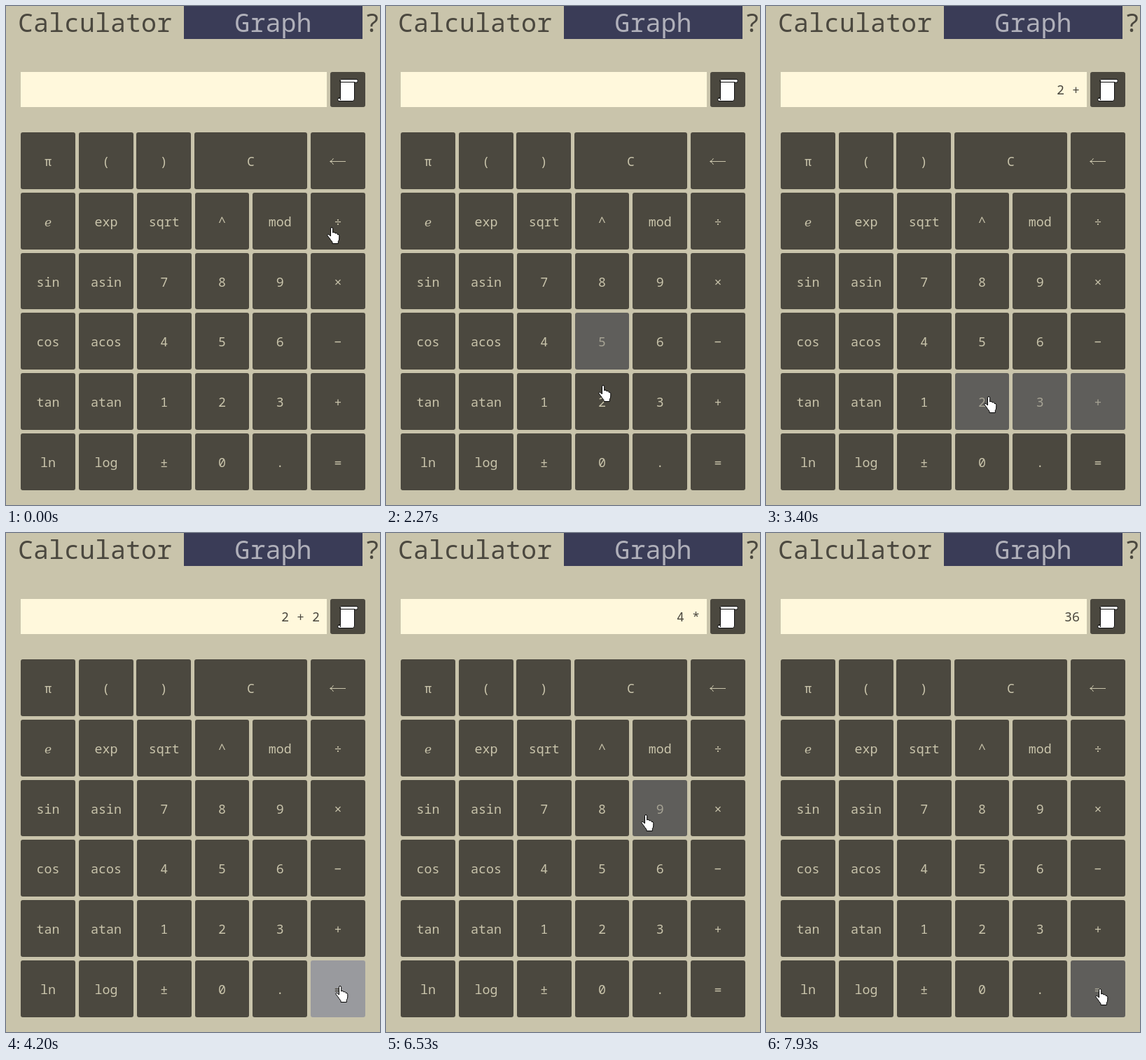
An HTML page for the animation above (8000 ms loop, 534 by 711 pixels).

```html
<!DOCTYPE html>
<html lang="en">
<head>
<meta charset="utf-8">
<title>Calculator</title>
<style>
  html, body { margin: 0; width: 100%; height: 100%; overflow: hidden; background: #c9c4ab; }
  svg { display: block; width: 534px; height: 711px; }
  text { font: 500 18.333px "Noto Sans Mono", monospace; fill: #4b483f; white-space: pre; }
  .title { font-size: 36.667px; font-weight: 400; }
  .key { fill: #4b483f; }
  .key text { fill: #c9c4ab; text-anchor: middle; }
  .key .script { font: italic 17px "DejaVu Sans", sans-serif; }
  .key path { fill: none; stroke: #c9c4ab; }
  .key.hover { fill: #5f5e5b; }
  .key.hover text { fill: #a6a394; }
  .key.press { fill: #999a9e; }
  .key.press text { fill: #4b483f; }
</style>
</head>
<body>
<svg viewBox="0 0 534 711">
  <rect width="534" height="711" fill="#c9c4ab"/>
  <text class="title" x="17" y="37">Calculator</text>
  <rect x="254" width="255" height="47" fill="#3a3c57"/>
  <text class="title" x="326.5" y="37" style="fill:#b0b0ba">Graph</text>
  <text class="title" x="512" y="37">?</text>
  <rect x="21" y="94" width="437" height="50" fill="#fff8dc"/>
  <text id="display" x="448" y="126" text-anchor="end"></text>
  <rect x="463" y="94" width="50" height="50" rx="3" fill="#4b483f"/>
  <g fill="#fff" stroke="#111">
    <path d="M477.5 106V131H474.5Q473 133 474.5 135.5H495Q497.5 135 497.5 132V109H501.5Q503 106.5 501.5 104.5H479Q476 104.5 477.5 109"/>
    <path d="M478 108.5H498M474.5 131.5H477.5V134" fill="none"/>
  </g>
  <g id="keys"></g>
  <path id="hand" fill="#fff" stroke="#000" stroke-linejoin="round"
    d="M5.5 2.3Q5.5 .5 7 .5T8.7 2.3V8Q9.8 7 11 7.6T12 9Q13.2 8.2 14.4 9T15.1 10.4Q17.5 9.8 17.8 12.3V16Q17.8 18.5 16.3 20.5V23.5H8V21.5Q5.5 18.5 3.5 15.3Q1 12.5 .8 11.5Q1 10 2.8 10.6Q4 11.2 5.5 13Z"/>
</svg>
<script>
const LOOP = 8000, TICK = 1000 / 15, PRESS = 2, LAG = 3;
const KEY_W = 77.8, KEY_H = 80.8, GAP = 5;
const rows = ['π ( ) C ←', 'ℯ exp sqrt ^ mod ÷', 'sin asin 7 8 9 ×',
  'cos acos 4 5 6 −', 'tan atan 1 2 3 +', 'ln log ± 0 . ='];

// Each trip of the hand; times are in ticks of 1/15 s.
const home = { x: 458, y: 315 };
const trips = [
  { from: 13, to: 23, x: 376, y: 517 },
  { from: 23, to: 28, x: 305, y: 493 },
  { from: 32, to: 36, x: 302, y: 556, press: 41, shows: '2' },
  { from: 41, to: 46, x: 451, y: 550, press: 46, shows: '2 +' },
  { from: 48, to: 52, x: 302, y: 556, press: 55, shows: '2 + 2' },
  { from: 55, to: 59, x: 470, y: 645, press: 63, shows: '4' },
  { from: 77, to: 88, x: 465, y: 411, press: 92, shows: '4 *' },
  { from: 92, to: 98, x: 364, y: 401, press: 100, shows: '4 * 9' },
  { from: 100, to: 107, x: 473, y: 681, press: 109, shows: '36' },
  { from: 110, to: 112, x: 470, y: 649 }
];

const byId = id => document.getElementById(id);
const display = byId('display'), hand = byId('hand');
const keys = [];

function add(parent, tag, attrs, text = '') {
  const node = document.createElementNS('http://www.w3.org/2000/svg', tag);
  for (const name in attrs) node.setAttribute(name, attrs[name]);
  node.textContent = text;
  return parent.appendChild(node);
}

function addKey(label, x, y, w, h) {
  const node = add(byId('keys'), 'g', { class: 'key' });
  const left = Math.round(x), top = Math.round(y);
  const right = Math.round(x + w), bottom = Math.round(y + h);
  add(node, 'rect', { x: left, y: top, width: right - left, height: bottom - top, rx: 3 });
  if (label === '←') add(node, 'path', { d: 'M485 221.5H463M467.5 217Q466 220.5 462.5 221.5Q466 222.5 467.5 226' });
  else add(node, 'text', { x: x + w / 2, y: top + 48, class: label === 'ℯ' ? 'script' : '' }, label);
  keys.push({ node, left, top, right, bottom });
}

rows.forEach((row, r) => {
  const gap = r ? GAP : GAP - 0.2;
  let x = 21.2;
  for (const label of row.split(' ')) {
    const w = label === 'C' ? 2 * KEY_W + GAP + 0.6 : KEY_W;
    addKey(label, x, 180 + 85.8 * r, w, KEY_H);
    x += w + gap;
  }
});

function handAt(tick) {
  let { x, y } = home;
  for (const trip of trips) {
    const u = Math.max(0, Math.min(1, (tick - trip.from) / (trip.to - trip.from)));
    const ease = 1 - (1 - u) ** 2;
    x += (trip.x - x) * ease;
    y += (trip.y - y) * ease;
  }
  return { x: Math.round(x), y: Math.round(y) };
}

function keyAt(tick) {
  const { x, y } = handAt(tick), tipX = x + 7, tipY = y + 1;
  return keys.find(k => tipX >= k.left && tipX < k.right && tipY >= k.top && tipY < k.bottom);
}

function draw(now) {
  const tick = Math.floor((now % LOOP + 4) / TICK);

  // The highlight trails the hand by a few ticks.
  const hovered = [];
  if (tick > trips[0].from) {
    for (let lag = 1; lag <= LAG; lag++) hovered.push(keyAt(tick - lag));
  }
  const active = trips.find(t => tick >= t.press && tick < t.press + PRESS);
  const pressed = active && keyAt(active.press);
  for (const key of keys) {
    const state = key === pressed ? ' press' : hovered.includes(key) ? ' hover' : '';
    key.node.setAttribute('class', 'key' + state);
  }

  const done = trips.filter(t => tick >= t.press + PRESS).pop();
  display.textContent = done ? done.shows : '';
  const { x, y } = handAt(tick);
  hand.setAttribute('transform', `translate(${x} ${y})`);
}

const start = performance.now();
function loop() {
  draw(performance.now() - start);
  requestAnimationFrame(loop);
}
loop();
</script>
</body>
</html>
```
